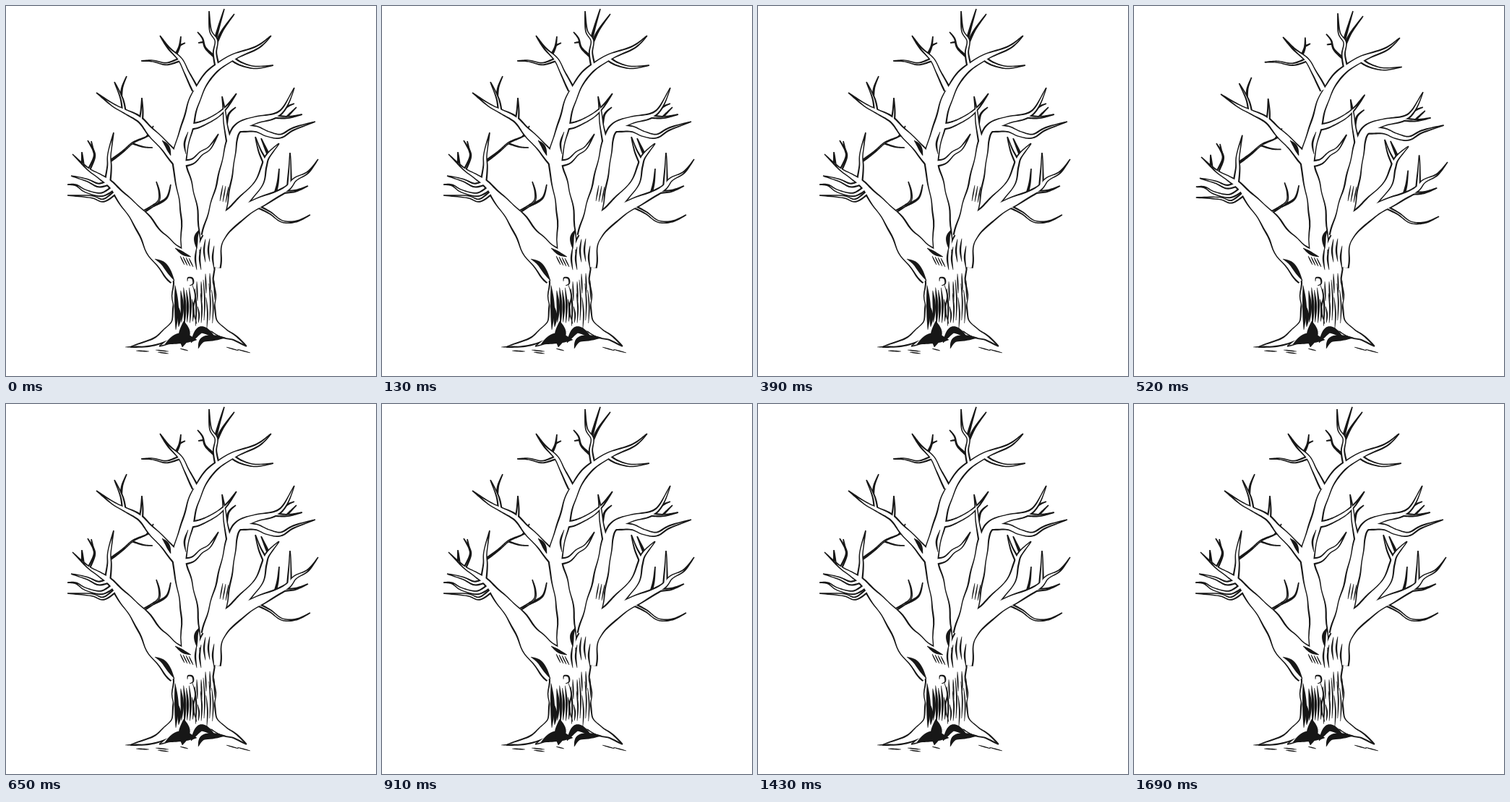
An HTML page with a canvas for the animation above (1.82 s loop, 512 px wide and 512 px high).

```html
<!DOCTYPE html>
<html lang="en">
<head>
<meta charset="utf-8">
<title>Bare tree</title>
<style>
html, body { margin: 0; overflow: hidden; background: #fff; }
canvas { display: block; }
</style>
</head>
<body>
<canvas id="stage" width="512" height="512"></canvas>
<script>
const ctx = document.getElementById('stage').getContext('2d');
const STEP = 130, STEPS = 14, INK = '#171717', PAPER = '#fff';

// A bough bends by `sway` at its tip; a twig leaves its parent at fraction `at`.
const bough = (sway, taper, r, path, ...twigs) => ({ sway, taper, r, path, twigs });
const twig = (r, at, path, ...twigs) => ({ r, at, path, twigs, taper: 0.8 });

const still = [0, 0];
const tree = [
  bough(still, 0, 29, '261,450 260,400 258,350'),
  // roots
  bough(still, 0.8, 13, '245,412 238,440 222,455 204,465 172,472'),
  bough(still, 0.8, 12, '276,412 284,438 300,452 316,459 333,471'),
  bough(still, 0.8, 9, '250,430 238,455 212,471'),
  // leader and crown
  bough([1, 3], 0.7, 14, '256,370 254,290 247,250 240,210 252,163 261,130 281,95 312,72 348,57 367,41',
    twig(3, 0.77, '289,65 291,48 283,34 281,7',
      twig(1.2, 0.15, '276,58 272,45 265,36', twig(0.5, 0.6, '266,51')),
      twig(1.3, 0.42, '300,33 316,11'),
      twig(1.3, 0.48, '295,27 302,4')),
    twig(3, 0.83, '325,80 345,85 370,82'),
    twig(4.5, 0.53, '268,164 290,153 305,140 319,121'),
    twig(4.5, 0.39, '258,215 270,204 282,196 294,177')),
  bough([-7, 2], 0.8, 4.5, '262,116 250,92 241,74 225,58 213,41',
    twig(2.2, 0.5, '222,80 203,76 187,76'),
    twig(1.2, 0.6, '240,56 242,42', twig(0.6, 0.5, '248,51'))),
  // left side
  bough([-5, 2], 0.9, 8, '238,215 218,192 200,174 185,157 165,146 148,137 125,120',
    twig(2.5, 0.51, '188,145 188,127'),
    twig(2.6, 0.68, '160,128 150,105', twig(1, 0.45, '161,112 167,97'))),
  bough([1, 4], 1.4, 25, '245,365 212,334 187,296 160,265 145,247 130,236 113,225 92,205',
    twig(4, 0.72, '143,222 143,205 149,175',
      twig(1.3, 0.4, '161,202 176,189 192,182 204,176',
        twig(0.5, 0.55, '190,195 203,196'), twig(0.5, 0.85, '204,166'))),
    twig(1.6, 0.85, '122,210 121,200 113,186', twig(0.5, 0.65, '118,187')),
    twig(1.5, 0.9, '105,202'),
    twig(3.2, 0.71, '128,248 112,241 90,235'),
    twig(3.2, 0.66, '132,261 110,256 97,248 85,247'),
    twig(2.6, 0.63, '135,269 118,264 85,262'),
    twig(1.6, 0.43, '198,280 211,270 212,257 208,243', twig(1.2, 0.4, '222,266 228,247'))),
  // right side
  bough([1, 6], 0.8, 13, '283,320 297,265 308,212 313,185 322,168 345,158 372,152 386,140 399,113',
    twig(4, 0.48, '304,165 302,145 299,125', twig(1.2, 0.4, '308,150 318,140')),
    twig(5, 0.6, '345,170 362,177 380,180 398,170 428,160'),
    twig(2.2, 0.8, '390,154 410,150', twig(0.7, 0.4, '402,140')),
    twig(1.2, 0.82, '388,140 399,135')),
  bough([2, 4], 0.7, 12, '275,340 290,307 312,287 330,268 350,245 357,222 362,208 378,190',
    twig(3.2, 0.82, '351,200 345,181'),
    twig(1.5, 0.88, '353,183')),
  bough([2, 4], 1.2, 17, '280,360 288,320 310,298 335,280 385,255 400,240 418,230 432,212',
    twig(3, 0.74, '393,220 393,203'),
    twig(1.3, 0.64, '376,245 378,225'),
    twig(2, 0.68, '400,256 418,249'),
    twig(2, 0.5, '365,286 382,298 402,298 421,289'))
];

const parse = path => path.split(' ').map(p => p.split(',').map(Number));

// Catmull-Rom curve through the points; t is the fraction of the length.
function trace(points) {
  const last = points.length - 1, curve = [];
  for (let k = 0; k <= last * 10; k++) {
    const i = Math.min(last - 1, Math.floor(k / 10)), u = k / 10 - i;
    const [a, b, c, d] = [i - 1, i, i + 1, i + 2].map(n => points[Math.max(0, Math.min(last, n))]);
    const [x, y] = [0, 1].map(n => b[n] + u * (c[n] - a[n] + u * (2 * a[n] - 5 * b[n] + 4 * c[n] - d[n]
      + u * (3 * b[n] - a[n] - 3 * c[n] + d[n]))) / 2);
    const before = curve[k - 1];
    curve.push({ x, y, length: before ? before.length + Math.hypot(x - before.x, y - before.y) : 0 });
  }
  const total = curve[curve.length - 1].length;
  return curve.map(p => ({ ...p, t: p.length / total }));
}

// Fills a band around the curve, `half(p)` wide on either side.
function fillBand(curve, half, colour) {
  const left = [], right = [];
  curve.forEach((p, i) => {
    const a = curve[Math.max(0, i - 1)], b = curve[Math.min(curve.length - 1, i + 1)];
    const size = half(p) / (Math.hypot(b.x - a.x, b.y - a.y) || 1);
    const nx = (a.y - b.y) * size, ny = (b.x - a.x) * size;
    left.push([p.x + nx, p.y + ny]);
    right.unshift([p.x - nx, p.y - ny]);
  });
  ctx.fillStyle = colour;
  ctx.beginPath();
  [...left, ...right].forEach(p => ctx.lineTo(...p));
  ctx.fill();
}

function inkLine(width, path) {
  fillBand(trace(parse(path)), p => 0.3 + width / 2 * Math.sin(Math.PI * p.t), INK);
}

function hatch(x, y, count, dx, dy) {
  for (let i = 0; i < count; i++) {
    inkLine(1, `${x + i * 4},${y + i} ${x + i * 4 + dx},${y + i + dy}`);
  }
}

// Lists a branch and all its twigs as curves.
function spread(branch, parent) {
  const points = parse(branch.path);
  if (parent) {
    const start = parent.find(p => p.t >= branch.at);
    points.unshift([start.x, start.y]);
  }
  const curve = trace(points);
  return [{ ...branch, curve }, ...branch.twigs.flatMap(child => spread(child, curve))];
}

function swayed(root, amount) {
  const branches = spread(root), spine = branches[0].curve;
  const base = spine[0], tip = spine[spine.length - 1];
  const reach = Math.hypot(tip.x - base.x, tip.y - base.y);
  const bend = p => {
    const pull = amount * Math.min(1, Math.hypot(p.x - base.x, p.y - base.y) / reach) ** 2;
    return { ...p, x: p.x + root.sway[0] * pull, y: p.y + root.sway[1] * pull };
  };
  return branches.map(b => ({ ...b, curve: b.curve.map(bend) }));
}

function drawBranches(amount) {
  const branches = tree.flatMap(root => swayed(root, amount));
  const half = b => p => b.r * (1 - p.t) ** b.taper * (1 + 0.05 * Math.sin(p.length * 0.16)) + 0.8;
  const inkWidth = p => 1.8 + 0.4 * Math.sin(p.length * 0.09 + 1);
  // All ink first, then all paper, so that the outlines merge at every fork.
  branches.forEach(b => fillBand(b.curve, half(b), INK));
  branches.forEach(b => fillBand(b.curve, p => Math.max(0, half(b)(p) - inkWidth(p)), PAPER));
}

function drawBark() {
  let seed = 7;
  const random = () => (seed = seed * 16807 % 2147483647) / 2147483647;
  for (let i = 0; i < 14; i++) {
    const x = 235 + i * 3.9, foot = 448 - random() * 14, top = foot - 20 - random() * 45;
    inkLine(1.2 + 4 * (1 - i / 14) ** 3, `${x},${foot} ${x + 1},${(foot + top) / 2} ${x - 1},${top}`);
  }
  for (let i = 0; i < 5; i++) {
    const x = 264 + i * 6, y = 315 + random() * 20;
    inkLine(1.8, `${x},${y} ${x - 2},${y + 16} ${x},${y + 32}`);
    inkLine(1.4, `${x},${y + 48} ${x + 1},${y + 75}`);
  }
  // knothole
  inkLine(1.8, '254,387 259,384 258,377 252,376 251,381');
  inkLine(1.6, '258,386 262,402 259,420 264,440');
  hatch(241, 346, 4, 6, 12);
  hatch(296, 270, 3, 4, -22);
  // shadows in the forks and under the roots
  inkLine(6, '206,350 219,358 233,380');
  inkLine(5, '216,186 223,194 228,207');
  inkLine(4, '234,335 246,343 256,347');
  inkLine(5, '268,309 263,320 264,336');
  inkLine(2, '249,205 247,190 252,174');
  inkLine(14, '220,468 240,460 264,462');
  inkLine(15, '246,436 247,452 244,472');
  inkLine(9, '256,466 270,448 290,459');
  inkLine(8, '266,474 274,461 304,459');
}

function drawGround() {
  ['165,472 187,471', '180,477 198,478', '207,476 225,478', '210,479 225,481',
    '241,474 252,477', '305,472 322,477', '320,475 338,480'].forEach(path => inkLine(1, path));
}

function draw(amount) {
  ctx.fillStyle = PAPER;
  ctx.fillRect(0, 0, 512, 512);
  drawBranches(amount);
  drawBark();
  drawGround();
}

let shown = -1;
function tick() {
  const step = Math.floor(performance.now() / STEP) % STEPS;
  // The boughs rest on the opening step, then swing on every second one.
  if (step !== shown) draw(step && step % 2 === 0 ? 1 : 0);
  shown = step;
  requestAnimationFrame(tick);
}
tick();
</script>
</body>
</html>
```
